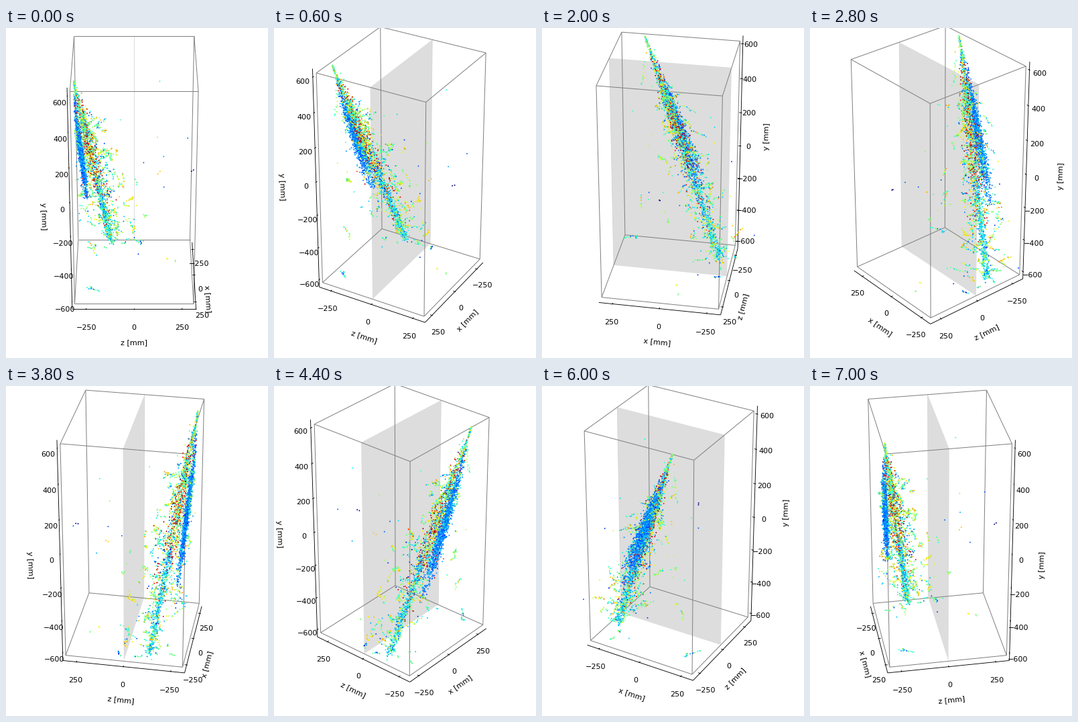
Write a matplotlib script that moves like this. It is 391x491 px and loops after 7200 ms.

```python
import itertools

import matplotlib.pyplot as plt
import numpy as np
from matplotlib.animation import FuncAnimation
from matplotlib.collections import LineCollection
from matplotlib.patches import Polygon

W, H, DPI = 391, 491, 80
FRAMES, INTERVAL = 36, 200

# Camera and box, in view units
ELEV = np.radians(30)
DIST, SCALE = 10, 2387
CENTER = np.array([191.2, 212.2])
HALF = np.array([0.3735, 0.3735, 0.747])
SPINE = 25 / 24
TICK_OUT, TICK_IN = 1 / 60, 1 / 30
TICK_LABEL = 1.158

# name, limit in mm, tick values, tick direction, label distance
AXES = [
    ("x [mm]", 310, range(-250, 251, 250), 1, 1.295),
    ("z [mm]", 310, range(-250, 251, 250), 0, 1.295),
    ("y [mm]", 620, range(-600, 601, 200), 0, 1.45),
]

rng = np.random.default_rng(12)


def project(points, azim):
    x, y, z = np.moveaxis(np.asarray(points, float), -1, 0)
    c, s = np.cos(azim), np.sin(azim)
    toward, right = x * c + y * s, y * c - x * s
    up = z * np.cos(ELEV) - toward * np.sin(ELEV)
    depth = toward * np.cos(ELEV) + z * np.sin(ELEV)
    k = SCALE / (DIST - depth)
    return CENTER + np.stack([right * k, -up * k], axis=-1), depth


# ---- particle shower ----
START = np.array([0.22, -0.36, 0.735])
END = np.array([-0.31, -0.15, -0.72])


def on_axis(t):
    return START + np.asarray(t)[..., None] * (END - START)


def spread(n, *sigmas):
    return rng.normal(size=(n, 3)) * np.stack(
        [np.broadcast_to(s, n) for s in sigmas], axis=-1)


def first_track(n=230):
    t = 0.3 * rng.random(n)
    s = 0.002 + 0.025 * t
    return on_axis(t) + spread(n, s, s, s), rng.normal(0.45, 0.12, n)


def blue_sheet(n=1150):
    t = np.clip(rng.normal(0.41, 0.12, n), 0.1, 0.68)
    p = on_axis(t)
    p[:, 1] = -0.372 + 0.1 * t
    return p + spread(n, 0.006 + 0.036 * t, 0.007, 0.02), rng.normal(0.26, 0.05, n)


def mixed_core(n=950):
    t = np.clip(rng.normal(0.42, 0.17, n), 0.08, 0.85)
    p = on_axis(t) + spread(n, 0.005 + 0.045 * t, 0.008 + 0.04 * t, 0.02)
    v = np.where(rng.random(n) < 0.3, rng.uniform(0.85, 1, n),
                 rng.uniform(0.2, 0.75, n))
    return p, v


def tail(n=380):
    t = rng.uniform(0.58, 1.0, n)
    return on_axis(t) + spread(n, 0.013, 0.011, 0.012), rng.normal(0.34, 0.08, n)


def curl(center, n, step=0.007):
    heading = rng.normal(size=3)
    walk = np.cumsum((heading + 1.3 * rng.normal(size=(n, 3))) * step * 0.6, axis=0)
    return center + walk - walk.mean(axis=0)


def halo(clusters=125):
    parts, values = [], []
    for _ in range(clusters):
        t = rng.uniform(0.2, 1.0)
        grow = min(1, t / 0.45)
        offset = rng.normal([-0.01, 0.025, 0], [0.065, 0.075, 0.06]) * grow
        n = rng.integers(2, 13)
        parts.append(curl(on_axis(t) + offset, n))
        values.append(rng.normal(rng.normal(0.49, 0.08), 0.13, n))
    return np.concatenate(parts), np.concatenate(values)


def strays(n=45):
    t = rng.uniform(0.2, 1, n)
    return on_axis(t) + spread(n, 0.14, 0.14, 0.1), rng.uniform(0.15, 0.7, n)


# x, z, y, hits, colour value
LONERS = [
    (0, 0.365, 0, 2, 0.01), (-0.275, 0.16, 0.484, 1, 0.38),
    (-0.22, 0.34, 0.11, 1, 0.22), (0.3, -0.26, -0.685, 14, 0.45),
    (0.238, -0.262, -0.408, 10, 0.55), (0.23, -0.33, 0.486, 12, 0.5),
    (0.11, -0.33, -0.11, 24, 0.52), (-0.08, 0.215, -0.707, 2, 0.65),
    (-0.1, 0.27, -0.74, 2, 0.5), (-0.2, 0, -0.64, 12, 0.4),
    (0, 0.07, -0.33, 6, 0.52), (-0.08, 0.157, -0.06, 2, 0.7),
    (0.1, 0.185, -0.06, 1, 0.22), (-0.1, 0.06, 0, 1, 0.22),
    (-0.05, 0.145, 0.21, 1, 0.52),
]


def loners():
    parts, values = [], []
    for *center, n, v in LONERS:
        p = curl(np.array(center), n)
        if n > 9:
            p[:, 2] += np.linspace(-0.022, 0.022, n)
        parts.append(p)
        values.append(v + 0.09 * rng.normal(size=n) * (n > 2))
    return np.concatenate(parts), np.concatenate(values)


groups = [first_track(), blue_sheet(), mixed_core(), tail(), halo(), strays(), loners()]
hits = np.concatenate([g[0] for g in groups])
hits[:, 1] = np.maximum(hits[:, 1], -0.362 + 0.012 * rng.random(len(hits)))
hits[:, 2] = np.clip(hits[:, 2], -0.74, 0.742)
colors = plt.get_cmap("jet")(np.clip(np.concatenate([g[1] for g in groups]), 0, 1))

# ---- artists ----
corners = list(itertools.product((-1, 1), repeat=3))
edges = np.array([pair for pair in itertools.combinations(corners, 2)
                  if np.count_nonzero(np.subtract(*pair)) == 1]) * HALF

fig = plt.figure(figsize=(W / DPI, H / DPI), dpi=DPI, facecolor="white")
ax = fig.add_axes([0, 0, 1, 1])
ax.set_xlim(0, W)
ax.set_ylim(H, 0)
ax.axis("off")

plane = Polygon(np.zeros((4, 2)), closed=True, fc="#dddddd", ec="none", zorder=1)
ax.add_patch(plane)
plane_edge, = ax.plot([], [], color="#d6d6d6", lw=0.8, zorder=1)
box = LineCollection([], colors="gray", linewidths=0.9, zorder=2)
spines = LineCollection([], colors="black", linewidths=0.8, zorder=3)
ax.add_collection(box)
ax.add_collection(spines)
dots = ax.scatter(hits[:, 0], hits[:, 1], s=3, c=colors, linewidths=0, zorder=4)

font = dict(family="DejaVu Sans", size=10, ha="center", zorder=5)
tick_texts = [[ax.text(0, 0, str(v).replace("-", "\u2212"), va="top", **font)
               for v in values] for _, _, values, _, _ in AXES]
name_texts = [ax.text(0, 0, spec[0], va="center", **font) for spec in AXES]


def place(side, axis, pos, factor):
    p = np.array(side, float) * factor
    p[axis] = pos
    return p


def draw_axis(i, side, azim):
    _, limit, values, tick_dir, name_dist = AXES[i]

    def to_screen(points):
        return project(np.array(points) * HALF, azim)[0]

    line = to_screen([place(side, i, s * SPINE, SPINE) for s in (-1, 1)])
    segments = [line]
    for value, text in zip(values, tick_texts[i]):
        pos = value / limit
        outer, inner = place(side, i, pos, SPINE), place(side, i, pos, SPINE)
        outer[tick_dir] += side[tick_dir] * TICK_OUT
        inner[tick_dir] -= side[tick_dir] * TICK_IN
        segments.append(to_screen([inner, outer]))
        text.set_position(to_screen(place(side, i, pos, TICK_LABEL)))

    dx, dy = line[1] - line[0]
    angle = np.degrees(np.arctan2(-dy, dx))
    name_texts[i].set_rotation((angle + 90) % 180 - 90)
    name_texts[i].set_position(to_screen(place(side, i, 0, name_dist)))
    return segments


def update(frame):
    azim = np.radians(frame * 360 / FRAMES)
    sx = 1 if np.cos(azim) >= 0 else -1
    sy = 1 if np.sin(azim) >= 0 else -1

    sheet = np.array([(-sx, 0, 1), (-sx, 0, -1), (sx, 0, -1), (sx, 0, 1)]) * HALF
    quad = project(sheet, azim)[0]
    plane.set_xy(quad)
    plane_edge.set_data(quad[:2, 0], quad[:2, 1])
    box.set_segments(list(project(edges, azim)[0]))

    sides = [(0, sy, -1), (sx, 0, -1), (sx, -sy, 0)]
    spines.set_segments([seg for i, side in enumerate(sides)
                         for seg in draw_axis(i, side, azim)])

    xy, depth = project(hits, azim)
    order = np.argsort(depth)
    dots.set_offsets(xy[order])
    dots.set_facecolors(colors[order])
    return [plane, plane_edge, box, spines, dots]


anim = FuncAnimation(fig, update, frames=FRAMES, interval=INTERVAL,
                     repeat=True, repeat_delay=0)
plt.show()
```
